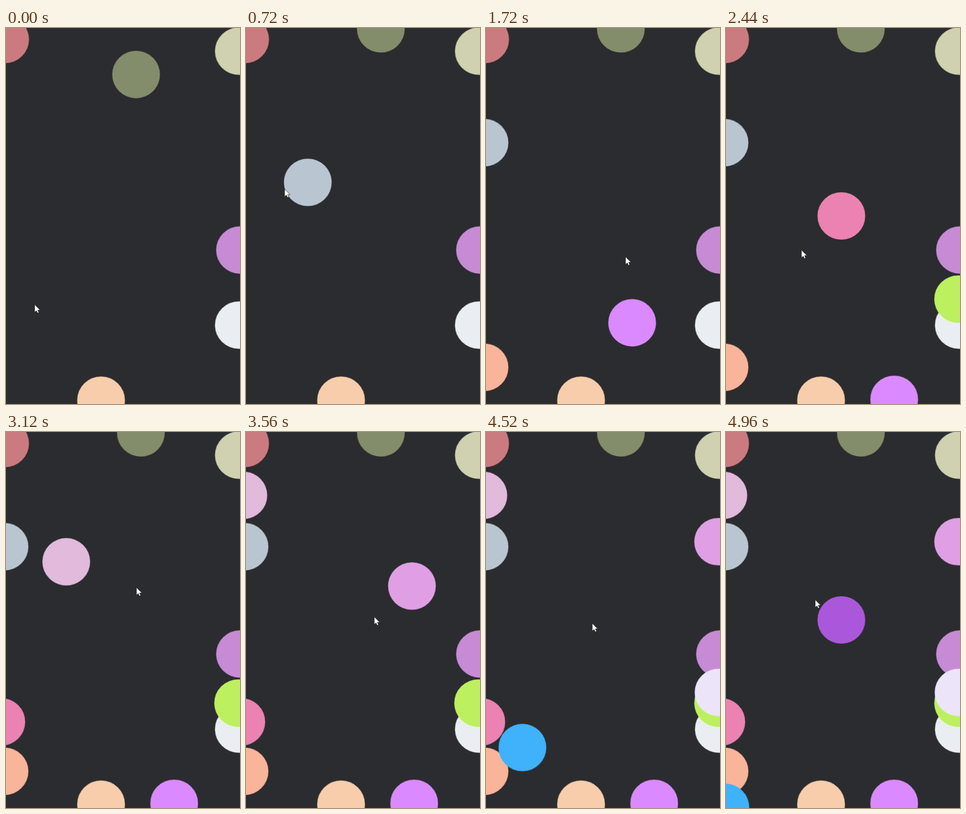
An HTML page for the animation above (5 s loop, 400x641 px).

```html
<!DOCTYPE html>
<html lang="en">
<head>
<meta charset="utf-8">
<title>Flung balls</title>
<style>
html, body { margin: 0; width: 100%; height: 100%; overflow: hidden; background: #2b2c2f; }
svg { display: block; width: 400px; height: 641px; }
ellipse { rx: 40.5px; ry: 40.1px; stroke-width: 1.2px; stroke-opacity: .5; }
</style>
</head>
<body>
<svg viewBox="0 0 400 641">
  <g id="balls"></g>
  <path id="cursor" d="M0 0V13L3 10.4L5 14.6L7.2 13.6L5.3 9.5H9.4Z"
        fill="#fff" stroke="#222" stroke-width=".7" stroke-linejoin="round"/>
</svg>
<script>
const LOOP = 5000, STEP = 40; // ms
const SPEED = 0.8;            // px per ms
const HOME = { x: 197.2, y: 320.4 };

const mix = (a, b, k) => a + (b - a) * k;
const clamp = v => Math.min(1, Math.max(0, v));
const smooth = k => k * k * (3 - 2 * k);

const group = document.getElementById('balls');
const cursor = document.getElementById('cursor');
const balls = [];
let landed = -Infinity;

// Each ball waits at home once the one before it has landed, then flies straight to (x, y).
function addBall(color, x, y, launch = -Infinity) {
  const el = document.createElementNS('http://www.w3.org/2000/svg', 'ellipse');
  el.setAttribute('fill', color);
  el.setAttribute('stroke', color);
  group.append(el);
  const flight = Math.hypot(x - HOME.x, y - HOME.y) / SPEED;
  balls.push({ el, x, y, launch, flight, born: landed });
  landed = launch + flight;
}

addBall('#cb7b80', -1.5, 19.5);
addBall('#d0d1b0', 398, 39.5);
addBall('#c78bd6', 400, 378.5);
addBall('#eaeef2', 398, 506.5);
addBall('#f7cdab', 162.5, 634.5);
addBall('#838d6c', 230.5, 1.5, -303);
addBall('#b9c6d2', -2.5, 195.5, 585);
addBall('#f9b59a', -2.5, 578.5, 880);
addBall('#da8afe', 287.5, 633, 1483);
addBall('#bdf05f', 396.8, 462.2, 2035);
addBall('#ec82b2', -8, 494.2, 2465);
addBall('#e2badb', -4.5, 108, 2949);
addBall('#e09fe5', 396.8, 187, 3430);
addBall('#ece5fa', 397.5, 444, 3905);
addBall('#3fb2fb', -1, 640, 4200);
addBall('#ab57dc', HOME.x, HOME.y, LOOP);

// time, x, y of the pointer tip
const pointer = [
  [0, 49, 471.5], [440, 200, 325], [580, 200, 325], [720, 66, 274.5], [1720, 238.5, 390],
  [2440, 129, 378.5], [3120, 223, 265], [4040, 215, 372], [4960, 152.5, 286], [LOOP, 152.5, 286]
];

function drawBall({ el, x, y, launch, flight, born }, t) {
  const k = flight ? clamp((t - launch) / flight) : 0;
  el.setAttribute('cx', mix(HOME.x, x, k));
  el.setAttribute('cy', mix(HOME.y, y, k));
  el.style.display = t >= born ? '' : 'none';
}

function drawCursor(t) {
  const i = pointer.findIndex(p => p[0] > t);
  const [t0, x0, y0] = pointer[i - 1], [t1, x1, y1] = pointer[i];
  const k = smooth((t - t0) / (t1 - t0));
  cursor.setAttribute('transform', `translate(${mix(x0, x1, k)} ${mix(y0, y1, k)})`);
}

const start = performance.now();
function draw() {
  const now = Math.max(0, performance.now() - start) % LOOP;
  const t = Math.floor(now / STEP) * STEP;
  balls.forEach(ball => drawBall(ball, t));
  drawCursor(t);
  requestAnimationFrame(draw);
}
draw();
</script>
</body>
</html>
```
